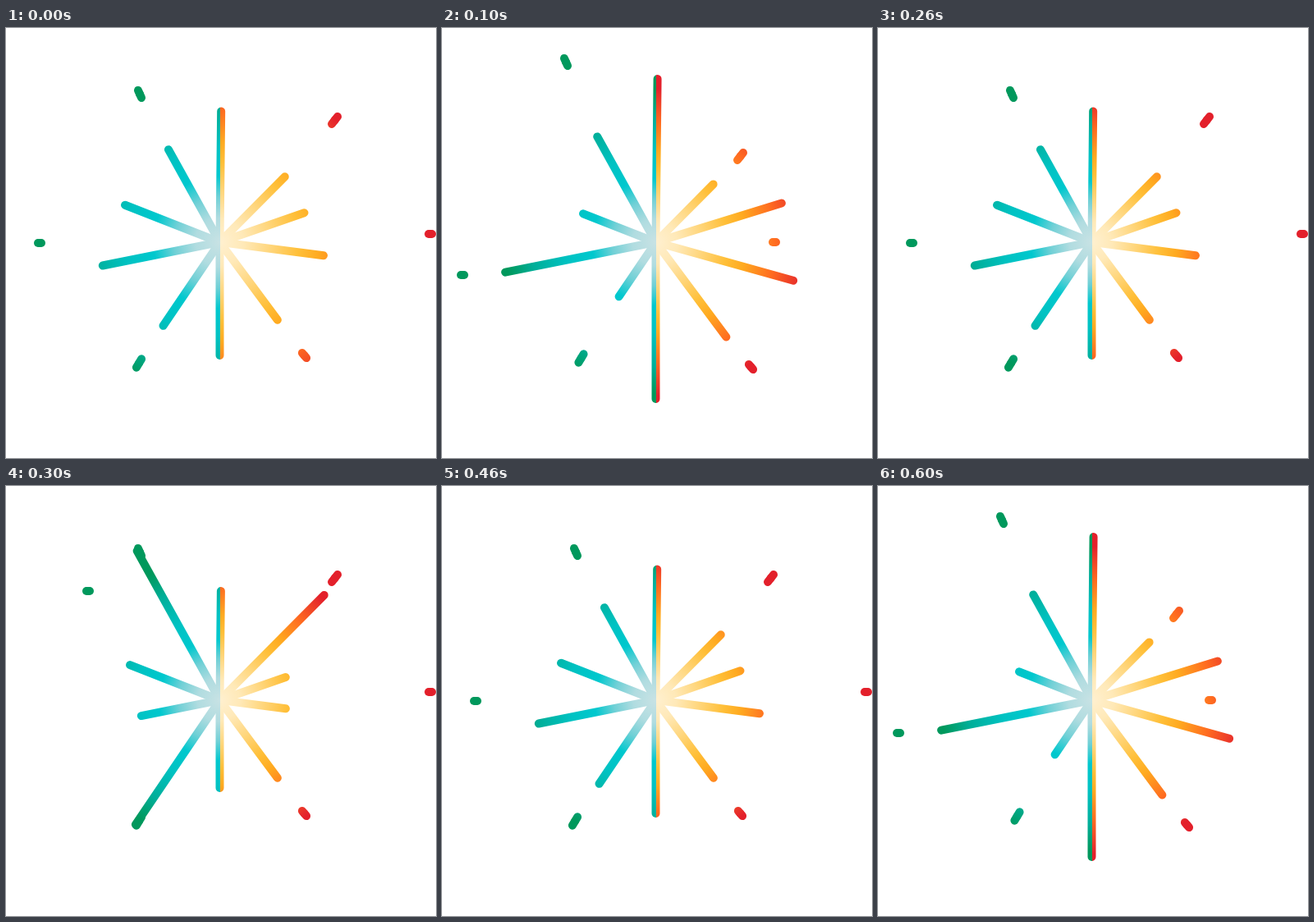
Animation, 524 px wide and 524 px high, one loop 0.7 s. Source, as an HTML page with a canvas:

```html
<!DOCTYPE html>
<html lang="en">
<head>
<meta charset="utf-8">
<title>Starburst</title>
<style>
  html, body { margin: 0; width: 100%; height: 100%; overflow: hidden; background: #fff; }
  canvas { display: block; }
</style>
</head>
<body>
<canvas id="stage" width="524" height="524"></canvas>
<script>
const SIZE = 524, CX = 260.5, CY = 261, SEAM = 261, STEP = 100;
const ctx = document.getElementById('stage').getContext('2d');
const rad = deg => deg * Math.PI / 180;

const COOL = [[0, '#c8e2e4'], [0.15, '#b0dce0'], [0.28, '#70d0d6'], [0.41, '#00c8ce'],
              [0.58, '#00c2c2'], [0.8, '#00ae98'], [0.9, '#00a173'], [0.97, '#00985c']];
const WARM = [[0, '#fff0d0'], [0.14, '#ffe9b8'], [0.3, '#ffd67c'], [0.47, '#ffbf38'],
              [0.59, '#ffaa20'], [0.78, '#ff6c20'], [0.96, '#e8302b'], [1, '#e3202b']];

// Shapes are indexed: 0 rest, 1 tall, 2 cross. Angles run clockwise from the right.
const spoke = (angle, lengths, sway = 0) => ({ angle, lengths, sway });
const axis = [spoke(-89.4, [159.5, 199, 133]), spoke(90, [138, 191, 107])];
const coolSpokes = [
  spoke(-119, [129, 147, 208]),
  spoke(-158.6, [124, 95, 117.5]),
  spoke(168.7, [145.5, 187, 97.5]),
  spoke(124.1, [123, 80, 183])
];
const warmSpokes = [
  spoke(-45.2, [112.5, 99.5, 180.5]),
  spoke(-19.2, [109, 160.5, 85], 2),
  spoke(7.3, [127.5, 174, 81], 8.3),
  spoke(53.4, [118, 144, 118])
];

// A spark keeps its tilt and hops between centres; cross reuses rest unless given.
const spark = (tilt, length, rest, tall, cross = rest) => ({ tilt, length, at: [rest, tall, cross] });
const coolSparks = [
  spark(66, 10, [163, 80.5], [151, 41.5]),
  spark(0, 4, [41, 262], [25, 301], [100, 128]),
  spark(-59, 12, [162, 408.5], [169.5, 402.5])
];
const warmSparks = [
  spark(-52, 11.4, [400.5, 112.5], [363.5, 156.5]),
  spark(0, 4, [517, 251], [405, 261]),
  spark(50, 8, [363.5, 399], [376.5, 413])
];

const dim = { shape: 0, coolR: 198, warmR: 206 };
const bright = { shape: 0, coolR: 182, warmR: 176 };
const tall = { shape: 1, coolR: 190, warmR: 187 };
const cross = { shape: 2, coolR: 180, warmR: 176 };
const sequence = [dim, tall, bright, cross, bright, cross, tall];

function radial(stops, r) {
  const g = ctx.createRadialGradient(CX, CY, 0, CX, CY, r);
  stops.forEach(([at, color]) => g.addColorStop(at, color));
  return g;
}

// Stroke from a point along an angle.
function stroke(x, y, deg, length) {
  ctx.beginPath();
  ctx.moveTo(x, y);
  ctx.lineTo(x + Math.cos(rad(deg)) * length, y + Math.sin(rad(deg)) * length);
  ctx.stroke();
}

function drawSpoke({ angle, lengths, sway }, shape) {
  stroke(CX, CY, angle + (shape === 1 ? sway : 0), lengths[shape]);
}

function drawSpark({ tilt, length, at }, shape) {
  const [x, y] = at[shape];
  stroke(x, y, tilt, length / 2);
  stroke(x, y, tilt, -length / 2);
}

function drawSide(shape, paint, spokes, sparks, left, right) {
  ctx.save();
  ctx.beginPath();
  ctx.rect(left, 0, right - left, SIZE);
  ctx.clip();
  ctx.strokeStyle = paint;
  [...axis, ...spokes].forEach(s => drawSpoke(s, shape));
  sparks.forEach(s => drawSpark(s, shape));
  ctx.restore();
}

function draw({ shape, coolR, warmR }) {
  ctx.fillStyle = '#fff';
  ctx.fillRect(0, 0, SIZE, SIZE);
  ctx.lineWidth = 10;
  ctx.lineCap = 'round';
  drawSide(shape, radial(COOL, coolR), coolSpokes, coolSparks, 0, SEAM);
  drawSide(shape, radial(WARM, warmR), warmSpokes, warmSparks, SEAM, SIZE);
}

const start = performance.now();
function tick() {
  const t = Math.max(0, performance.now() - start);
  draw(sequence[Math.floor(t / STEP) % sequence.length]);
  requestAnimationFrame(tick);
}
tick();
</script>
</body>
</html>
```
